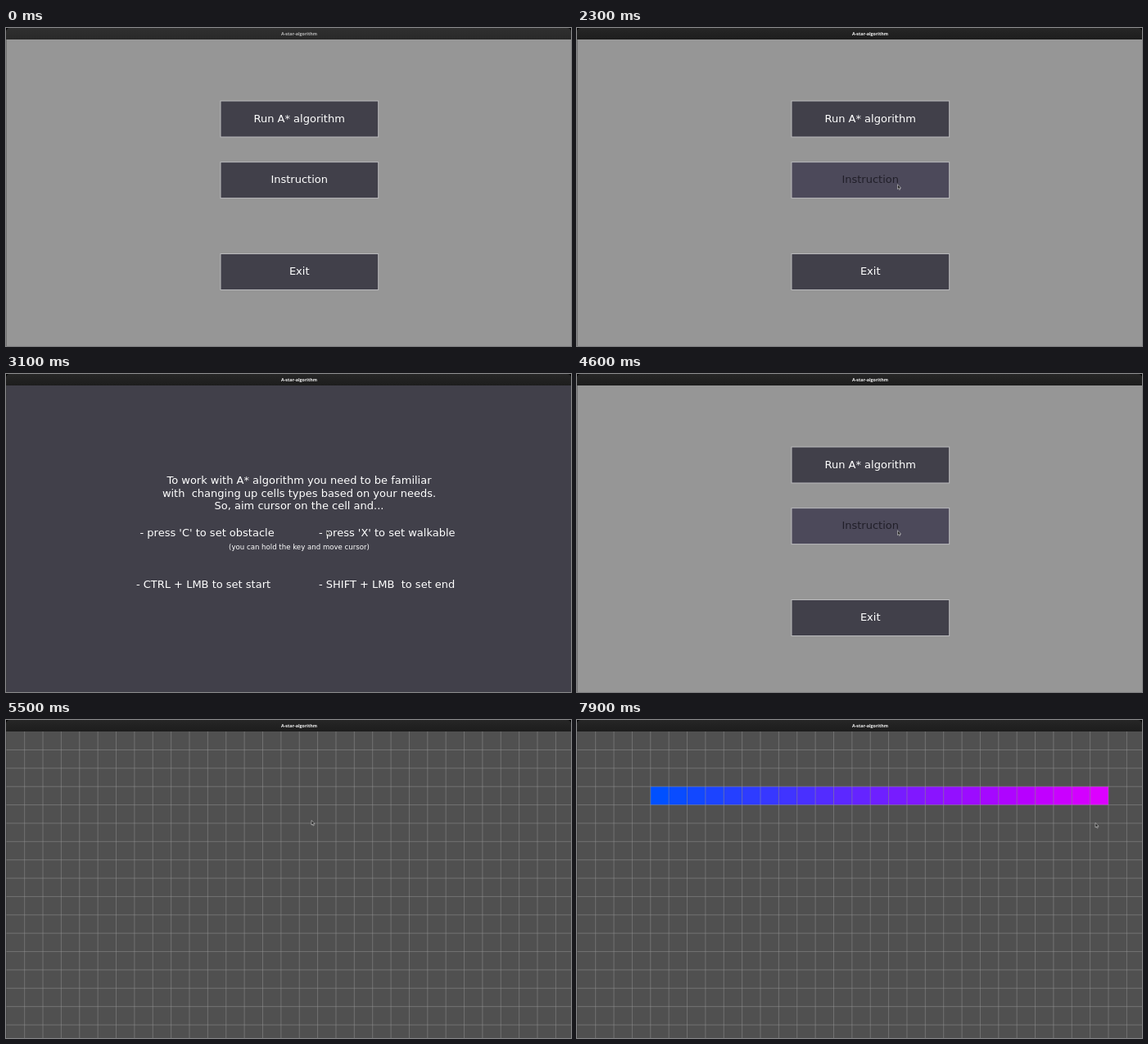
Animation, 690 px wide and 388 px high, one loop 8 s. Source, as an HTML page:

```html
<!DOCTYPE html>
<html lang="en">
<head>
<meta charset="utf-8">
<title>A-star-algorithm</title>
<style>
  html, body { margin: 0; width: 100%; height: 100%; overflow: hidden; background: #000; }
  svg { display: block; width: 100%; height: 100%; }
  text { font: 13px "DejaVu Sans", sans-serif; fill: #fff; text-anchor: middle; white-space: pre; }
  .note { font-size: 8.6px; }
  #title { font: bold 5.35px "Open Sans", sans-serif; }
  .button rect { fill: #41404a; stroke: #b9b9bc; stroke-width: 1; }
  .button.hover rect { fill: #4c495a; }
  .button.hover text { fill: #211f29; }
</style>
</head>
<body>
<svg id="stage" viewBox="0 0 690 388">
  <defs>
    <linearGradient id="bar" x2="0" y2="1">
      <stop offset="0" stop-color="#303030"/>
      <stop offset="1" stop-color="#292929"/>
    </linearGradient>
    <linearGradient id="barActive" x2="0" y2="1">
      <stop offset="0" stop-color="#262626"/>
      <stop offset="1" stop-color="#1d1d1d"/>
    </linearGradient>
  </defs>
  <rect id="back" y="14" width="690" height="374"/>
  <g id="menu"></g>
  <g id="help"></g>
  <g id="board"><g id="cells"></g><path id="lines" fill="none" stroke="#999" stroke-opacity=".52" stroke-width=".9"/></g>
  <path d="M.25 14V388" stroke="#3a3a3a" stroke-width=".5"/>
  <path id="titleBar" d="M0 14V5Q0 0 5 0H685Q690 0 690 5V14Z"/>
  <text id="title" x="358" y="9.2">A-star-algorithm</text>
  <path id="cursor" d="M0 0V5.6L1.3 4.5L2.2 6.5L3.2 6L2.4 4.1H4.2Z" fill="#222" stroke="#e4e4e4" stroke-width=".55" stroke-linejoin="round"/>
</svg>
<script>
const LOOP = 8000, STEP = 100;
const CELL = 22.37, LEFT = 0.3, TOP = 14.1;
const START_COL = 4, END_COL = 28, PATH_ROW = 3;
const HELP_AT = 3000, MENU_AT = 4600, BOARD_AT = 5500;
const START_AT = 6600, END_AT = 7300, PATH_AT = 7400;

const $ = id => document.getElementById(id);

function add(parent, name, attrs, content = '') {
  const el = document.createElementNS('http://www.w3.org/2000/svg', name);
  for (const key in attrs) el.setAttribute(key, attrs[key]);
  el.textContent = content;
  parent.append(el);
  return el;
}

function show(el, on) {
  el.setAttribute('visibility', on ? 'visible' : 'hidden');
}

const buttons = [['Run A* algorithm', 89], ['Instruction', 163.6], ['Exit', 275.5]].map(([label, y]) => {
  const el = add($('menu'), 'g', { class: 'button' });
  add(el, 'rect', { x: 262, y, width: 192.7, height: 44 });
  add(el, 'text', { x: 358.2, y: y + 25.5 }, label);
  return { el, y };
});

[
  ['To work with A* algorithm you need to be familiar', 358, 134.2],
  ['with  changing up cells types based on your needs.', 358, 149.8],
  ['So, aim cursor on the cell and...', 358, 165.4],
  ["- press 'C' to set obstacle", 245.6, 198.4],
  ["- press 'X' to set walkable", 465.3, 198.4],
  ['- CTRL + LMB to set start', 241, 260.8],
  ['- SHIFT + LMB  to set end', 465.2, 260.8],
].forEach(([line, x, y]) => add($('help'), 'text', { x, y }, line));
add($('help'), 'text', { x: 358, y: 213.8, class: 'note' }, '(you can hold the key and move cursor)');

let grid = '';
for (let x = LEFT + CELL; x < 690; x += CELL) grid += `M${x.toFixed(2)} 14V388`;
for (let y = TOP + CELL; y < 388; y += CELL) grid += `M0 ${y.toFixed(2)}H690`;
$('lines').setAttribute('d', grid);

const cells = [];
for (let col = START_COL; col <= END_COL; col++) {
  const k = (col - START_COL) / (END_COL - START_COL);
  const fill = `rgb(${Math.round(220 * k)},${Math.round(Math.max(0, 80 - 96 * k))},255)`;
  cells.push(add($('cells'), 'rect', {
    x: LEFT + col * CELL, y: TOP + PATH_ROW * CELL, width: CELL, height: CELL, fill
  }));
}

// Cursor track: time, x, y
const track = [
  [500, 497, 224], [700, 531.5, 213],
  [1800, 531.5, 213], [2300, 391.5, 191],
  [4700, 391.5, 191], [5200, 373, 122.5],
  [5500, 373, 122.5], [6300, 100, 92],
  [6600, 100, 92], [6700, 190, 108], [6800, 370, 122], [6900, 532, 126.5],
  [7000, 602, 122], [7100, 630, 106], [7200, 635, 93],
  [7400, 635, 93], [7500, 626, 101], [7600, 607, 115], [7700, 615, 122], [7900, 633, 125.5],
];

function cursorAt(t) {
  let i = 0;
  while (i < track.length - 2 && t >= track[i + 1][0]) i++;
  const [t0, x0, y0] = track[i], [t1, x1, y1] = track[i + 1];
  const k = Math.min(1, Math.max(0, (t - t0) / (t1 - t0)));
  const e = k * k * (3 - 2 * k);
  return [x0 + (x1 - x0) * e, y0 + (y1 - y0) * e];
}

function render(ms) {
  const t = Math.floor(ms % LOOP / STEP) * STEP;
  const [x, y] = cursorAt(t);
  const help = t >= HELP_AT && t < MENU_AT;
  const board = t >= BOARD_AT;
  const active = t >= 1400;

  $('back').setAttribute('fill', help ? '#41404a' : board ? '#505050' : '#969696');
  show($('menu'), !help && !board);
  show($('help'), help);
  show($('board'), board);

  buttons.forEach(b => {
    const over = t >= 500 && x > 262 && x < 455 && y > b.y && y < b.y + 44;
    b.el.classList.toggle('hover', over);
  });
  cells.forEach((cell, i) => {
    const from = i === 0 ? START_AT : i === cells.length - 1 ? END_AT : PATH_AT;
    show(cell, t >= from);
  });

  $('titleBar').setAttribute('fill', active ? 'url(#barActive)' : 'url(#bar)');
  $('title').style.fill = active ? '#f4f4f4' : '#b9b9b9';
  show($('cursor'), t >= 500);
  $('cursor').setAttribute('transform', `translate(${x.toFixed(2)} ${y.toFixed(2)})`);
}

const began = performance.now();
function tick() {
  render(performance.now() - began);
  requestAnimationFrame(tick);
}
tick();
</script>
</body>
</html>
```
